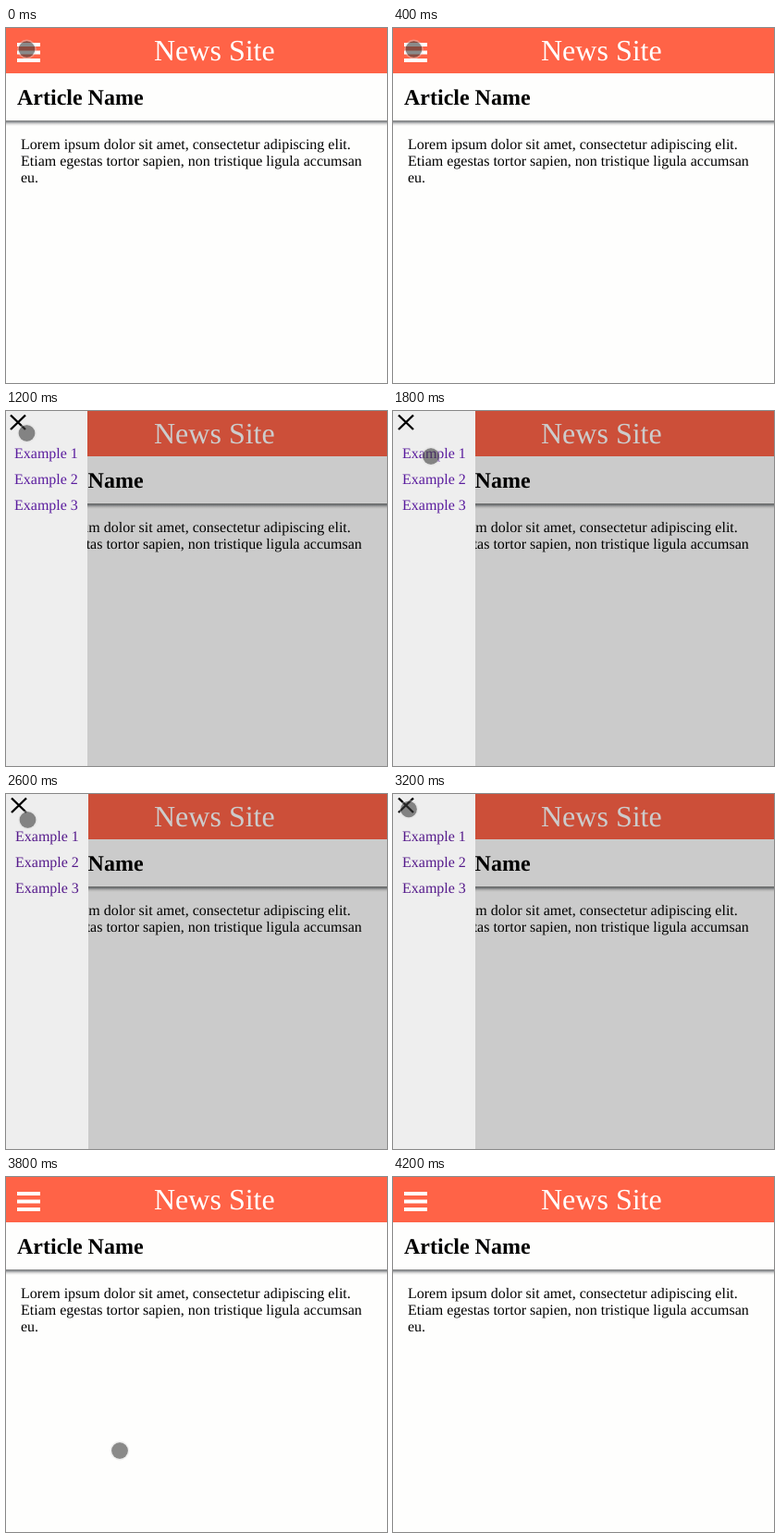
Write an HTML page that moves like this. It is 412 px wide and 384 px high and loops after 4800 ms.

```html
<!DOCTYPE html>
<html lang="en">
<head>
<meta charset="utf-8">
<title>Off-canvas menu</title>
<style>
  html, body { margin: 0; width: 100%; height: 100%; overflow: hidden; background: #fefefd; }
  svg { display: block; width: 412px; height: 384px; }
  text { font-family: "Liberation Serif", "Times New Roman", serif; font-size: 16px; text-rendering: geometricPrecision; }
</style>
</head>
<body>
<svg viewBox="0 0 412 384">
  <defs>
    <linearGradient id="shade" x1="0" y1="0" x2="0" y2="1">
      <stop offset="0" stop-color="#666" stop-opacity=".85"/>
      <stop offset=".3" stop-color="#70757a" stop-opacity=".75"/>
      <stop offset=".65" stop-color="#888" stop-opacity=".25"/>
      <stop offset="1" stop-color="#888" stop-opacity="0"/>
    </linearGradient>
  </defs>

  <rect width="412" height="384" fill="#fefefd"/>
  <rect width="412" height="49" fill="#ff6347"/>
  <text x="160" y="35" style="font-size:32px" fill="#fff">News Site</text>
  <path id="bars" d="M12 18H37M12 26.5H37M12 35H37" stroke="#fff" stroke-width="4"/>
  <text x="12" y="83" style="font-size:24px" font-weight="bold">Article Name</text>
  <rect y="100" width="412" height="6" fill="url(#shade)"/>
  <text y="131">
    <tspan x="16">Lorem ipsum dolor sit amet, consectetur adipiscing elit.</tspan>
    <tspan x="16" dy="18">Etiam egestas tortor sapien, non tristique ligula accumsan</tspan>
    <tspan x="16" dy="18">eu.</tspan>
  </text>

  <g id="overlay">
    <rect width="412" height="384" fill="#000" opacity=".2"/>
    <g id="menu">
      <rect x="-10" width="99" height="384" fill="#eee"/>
      <path d="M6 4.5L22 20M22 4.5L6 20" stroke="#000" stroke-width="2.4" fill="none"/>
      <g id="links">
        <text x="10" y="51">Example 1</text>
        <text x="10" y="79">Example 2</text>
        <text x="10" y="107">Example 3</text>
      </g>
    </g>
  </g>

  <g id="touch">
    <circle r="9" fill="#3c3c3c" fill-opacity=".6"/>
    <circle r="9.6" fill="none" stroke="#ddd" stroke-opacity=".4" stroke-width="1.6"/>
  </g>
</svg>
<script>
  const LOOP = 4800, OPEN = 1200, SETTLED = 1400, CLOSE = 3400;

  // The touch point is sampled and held: [start ms, x, y]; no position hides it.
  const touches = [
    [0, 22.5, 23], [800, 22.5, 24], [1400, 29, 41], [1600, 41, 49],
    [2400, 40, 41], [2600, 23.5, 28], [2800, 18, 19], [3000, 16, 15],
    [3200, 17, 16.5], [3400, 17.5, 17], [3800, 123, 296], [4000, 79, 141], [4200]
  ];

  const el = id => document.getElementById(id);
  const overlay = el("overlay"), menu = el("menu"), links = el("links"), touch = el("touch");
  const show = (node, on) => node.setAttribute("display", on ? "inline" : "none");
  const move = (node, x, y) => node.setAttribute("transform", `translate(${x} ${y})`);

  function draw(t) {
    show(overlay, t >= OPEN && t < CLOSE);
    move(menu, t < SETTLED ? -1 : 0, 0);
    links.setAttribute("fill", t < 2200 ? "#5a1c9e" : "#551a8b");

    const [, x, y] = touches.filter(p => p[0] <= t).pop();
    show(touch, x !== undefined);
    if (x !== undefined) move(touch, x, y);
  }

  const start = performance.now();
  function tick() {
    draw((performance.now() - start) % LOOP);
    requestAnimationFrame(tick);
  }
  draw(0);
  requestAnimationFrame(tick);
</script>
</body>
</html>
```
